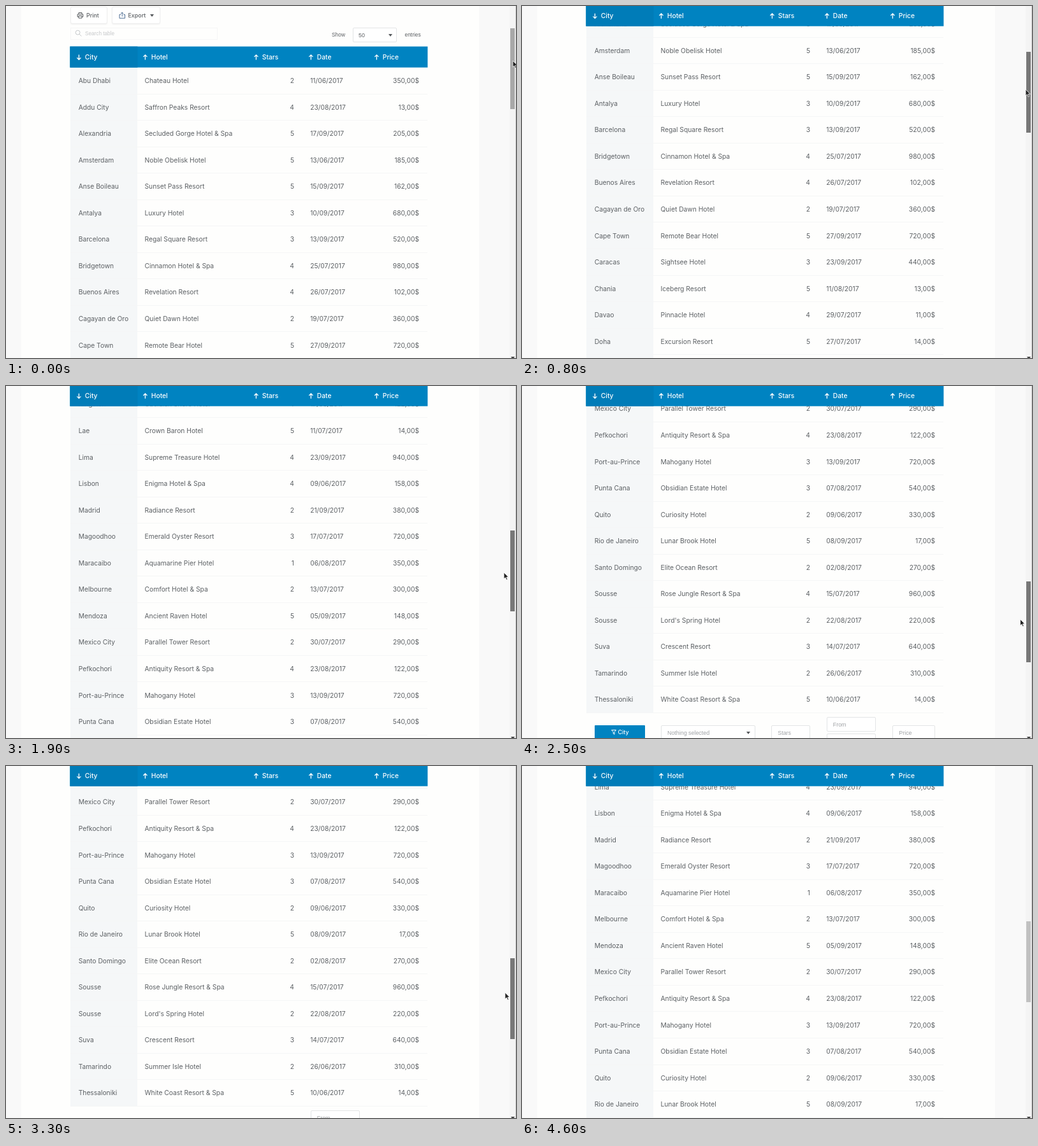
These frames come from a looping animation (800x553 px, 5100 ms). An HTML page:

```html
<!DOCTYPE html>
<html lang="en">
<head>
<meta charset="utf-8">
<title>Hotel table</title>
<style>
html, body { margin: 0; width: 100%; height: 100%; overflow: hidden; }
body { background: #f9f9f9; font: 10.28px Inter, sans-serif; color: #5c6064; }
#stage { position: absolute; left: 0; top: 0; width: 800px; height: 553px; overflow: hidden; }
#stage div, #stage span, #stage svg { position: absolute; box-sizing: border-box; white-space: pre; }
#card { left: 24px; top: 0; width: 718px; height: 553px; background: #fefefd; }
#page { left: 0; top: 0; width: 790px; height: 2000px; }
#cities { left: 101px; top: 97px; width: 105px; height: 1662px; background: #f5f7f8; }
.row { left: 101px; width: 560px; height: 41.55px; line-height: 41.6px; border-bottom: 1px solid #f5f6f6; }
.row span { top: 0; }
#head { left: 100px; top: 0; width: 561px; height: 33px; line-height: 33px; background: #0083c1; color: #fff; font-weight: 500; }
#head::before { content: ""; position: absolute; width: 106px; height: 33px; background: #007cb8; }
#head path { stroke-width: 1.3; }
.box { border: 1px solid #e3e5e6; border-radius: 2px; background: #fff; }
.btn { border: 1px solid #f0f0f0; border-radius: 3px; background: #fff; box-shadow: 0 1px 2px #0001; }
.label { line-height: 12px; font-size: 8.9px; }
.arial { font-family: "Liberation Sans", Arial, sans-serif; }
.hint { color: #a0a3a6; }
.caret { border: 3.5px solid transparent; border-top: 4px solid #55595c; border-bottom: 0; }
#track { left: 790px; top: 0; width: 10px; height: 553px; background: #f4f4f4; border-right: 1px solid #cfcfcf; }
#thumb { left: 791px; top: 0; width: 7px; height: 127px; }
#down { left: 792px; top: 551px; border-top-color: #444; }
#cursor { left: 0; top: 0; overflow: visible; }
</style>
</head>
<body>
<div id="stage">
  <div id="card"></div>
  <div id="page"><div id="cities"></div></div>
  <div id="head"></div>
  <div id="track"></div>
  <div id="thumb"></div>
  <div id="down" class="caret"></div>
  <svg id="cursor" width="10" height="14"><path d="M0 0V10L2.4 7.9 4 11.6 5.7 10.9 4.1 7.3H7.2Z" fill="#222" stroke="#fff" stroke-width=".8"/></svg>
</div>
<script>
const ROW = 41.55, TOP = 97, LOOP = 5100, STEP = 100, RELEASE = 3700;
const $ = id => document.getElementById(id);
const page = $('page'), head = $('head'), thumb = $('thumb'), cursor = $('cursor');

// city|hotel|stars|day/month|price
const rows = `Abu Dhabi|Chateau Hotel|2|11/06|350
Addu City|Saffron Peaks Resort|4|23/08|13
Alexandria|Secluded Gorge Hotel & Spa|5|17/09|205
Amsterdam|Noble Obelisk Hotel|5|13/06|185
Anse Boileau|Sunset Pass Resort|5|15/09|162
Antalya|Luxury Hotel|3|10/09|680
Barcelona|Regal Square Resort|3|13/09|520
Bridgetown|Cinnamon Hotel & Spa|4|25/07|980
Buenos Aires|Revelation Resort|4|26/07|102
Cagayan de Oro|Quiet Dawn Hotel|2|19/07|360
Cape Town|Remote Bear Hotel|5|27/09|720
Caracas|Sightsee Hotel|3|23/09|440
Chania|Iceberg Resort|5|11/08|13
Davao|Pinnacle Hotel|4|29/07|11
Doha|Excursion Resort|5|27/07|14
Florence|Mirror Resort|4|06/08|11
Freetown|Royal Tide Resort|2|02/08|250
Ilopango|Seashore Hotel & Spa|4|16/09|890
Kingston|Grandiose Renaissance Resort|3|09/07|620
Kingston|Obsidian Shore Hotel|4|17/08|122
Lae|Crown Baron Hotel|5|11/07|14
Lima|Supreme Treasure Hotel|4|23/09|940
Lisbon|Enigma Hotel & Spa|4|09/06|158
Madrid|Radiance Resort|2|21/09|380
Magoodhoo|Emerald Oyster Resort|3|17/07|720
Maracaibo|Aquamarine Pier Hotel|1|06/08|350
Melbourne|Comfort Hotel & Spa|2|13/07|300
Mendoza|Ancient Raven Hotel|5|05/09|148
Mexico City|Parallel Tower Resort|2|30/07|290
Pefkochori|Antiquity Resort & Spa|4|23/08|122
Port-au-Prince|Mahogany Hotel|3|13/09|720
Punta Cana|Obsidian Estate Hotel|3|07/08|540
Quito|Curiosity Hotel|2|09/06|330
Rio de Janeiro|Lunar Brook Hotel|5|08/09|17
Santo Domingo|Elite Ocean Resort|2|02/08|270
Sousse|Rose Jungle Resort & Spa|4|15/07|960
Sousse|Lord's Spring Hotel|2|22/08|220
Suva|Crescent Resort|3|14/07|640
Tamarindo|Summer Isle Hotel|2|26/06|310
Thessaloniki|White Coast Resort & Spa|5|10/06|14`.split('\n').map(r => r.split('|'));

function add(parent, tag, cls, style, text = '') {
  const el = document.createElement(tag);
  el.className = cls;
  el.style.cssText = style;
  el.textContent = text;
  parent.append(el);
  return el;
}
const box = (cls, x, y, w, h, extra = '') =>
  add(page, 'div', cls, `left:${x}px;top:${y}px;width:${w}px;height:${h}px;${extra}`);
const label = (text, x, mid, cls = '', extra = '') =>
  add(page, 'span', 'label ' + cls, `left:${x}px;top:${mid - 6}px;${extra}`, text);
const caret = (x, y) => add(page, 'div', 'caret', `left:${x - 3.5}px;top:${y - 2}px`);
function icon(parent, x, y, d, color, fill = 'none') {
  parent.insertAdjacentHTML('beforeend',
    `<svg width="12" height="12" style="left:${x}px;top:${y}px"><path d="${d}" fill="${fill}" stroke="${color}"/></svg>`);
}

// toolbar
box('btn', 101, 1, 58, 27);
icon(page, 111, 9, 'M3 4V1.5H8V4M3 8H1.2V4H9.8V8H8M3 6.5H8V10H3Z', '#55595c');
label('Print', 126, 15, '', 'font-weight:500');
box('btn', 166, 1, 76, 27);
icon(page, 177, 9, 'M3 4.5H1V10.2H9.5V4.5H7.5M5.2 7.5V1M3 3.2L5.2 1L7.4 3.2', '#4f6f94');
label('Export', 191.5, 15, '', 'font-weight:500');
caret(229, 14.5);
box('', 101, 34, 231, 19, 'border:1px solid #f6f6f6');
icon(page, 108, 37, 'M8 4.7A3.4 3.4 0 1 1 1.2 4.7A3.4 3.4 0 1 1 8 4.7M7 7.2L10.3 10.5', '#c4c7c9');
label('Search table', 124, 43.5, 'arial', 'font-size:8.2px;color:#c6c8ca');
label('Show', 511, 45, 'arial', 'font-size:8.4px');
box('box', 544, 34, 69, 23);
label('50', 553, 46, 'arial');
caret(603, 46);
label('entries', 625.5, 45, 'arial', 'font-size:8.4px');

// header cells: title, arrow x
[['City', 114], ['Hotel', 218], ['Stars', 392], ['Date', 478], ['Price', 581]].forEach(([title, x], i) => {
  const d = i ? 'M4 9V1.5M1 4.3L4 1.3L7 4.3' : 'M4 1V8.5M1 5.7L4 8.7L7 5.7';
  icon(head, x - 104, 11.5, d, '#fff');
  add(head, 'span', '', `left:${x - 90.6}px;top:0`, title);
});

rows.forEach(([city, hotel, stars, day, price], i) => {
  const row = add(page, 'div', 'row', `top:${TOP + i * ROW}px`);
  add(row, 'span', '', 'left:12.7px', city);
  add(row, 'span', '', 'left:116.5px', hotel);
  add(row, 'span', '', 'right:209px', stars);
  add(row, 'span', '', 'left:376.2px', day + '/2017');
  add(row, 'span', '', 'right:13px', price + ',00$');
});

// filters below the table
box('', 114, 1777.5, 78.5, 23.5, 'background:#0083c1;border-radius:1px');
icon(page, 139, 1784, 'M1.5 1.5H8.5L6 4.7V8.3L4.2 7V4.7Z', '#fff');
label('City', 150.5, 1789, '', 'color:#fff;font-weight:500');
box('box', 218, 1778, 148, 23);
label('Nothing selected', 228, 1790, 'arial hint');
caret(355, 1789.5);
[['Stars', 391, 1778, 61], ['From', 477.5, 1765, 77.5], ['To', 477.5, 1791, 77.5], ['Price', 581, 1778, 67]]
  .forEach(([text, x, y, w]) => {
    box('box', x, y, w, 23);
    label(text, x + 10.3, y + 11.5, 'arial hint');
  });
box('', 101, 1820, 560, 1, 'background:#f4f5f5');
label('Showing 1 to 40 of 40 entries', 113, 1848, '', 'font-size:9px;color:#45484b');

// time, scroll, scroll speed per ms, cursor x, cursor distance below thumb top
const keys = [
  [0, 0, 0, 795, 51],
  [600, 55, .26, 791, 57],
  [800, 172, .6, 790, 59],
  [1500, 580, .7, 783, 68],
  [1900, 878, .72, 781, 66],
  [3000, 1367, 0, 782, 54],
  [RELEASE, 957, -.25, 784, 54]
];

function pose(t) {
  t = Math.min(t, RELEASE);
  let i = 1;
  while (t > keys[i][0]) i++;
  const [t0, s0, v0, x0, o0] = keys[i - 1], [t1, s1, v1, x1, o1] = keys[i];
  const d = t1 - t0, u = (t - t0) / d, w = 1 - u;
  return {
    scroll: s0 * w * w * (1 + 2 * u) + s1 * u * u * (3 - 2 * u) + d * u * w * (v0 * w - v1 * u),
    x: x0 + (x1 - x0) * u,
    lead: o0 + (o1 - o0) * u
  };
}

const move = (el, x, y) => el.style.transform = `translate(${x}px,${y}px)`;
function draw(now) {
  const t = Math.floor(now % LOOP / STEP) * STEP;
  const { scroll, x, lead } = pose(t);
  const s = Math.round(scroll), y = Math.floor(35 + scroll / 4.57);
  move(page, 0, -s);
  move(head, .4, Math.max(63.6 - s, -1.3));
  move(thumb, 0, y);
  thumb.style.background = t < STEP ? '#a8a8a8' : t < RELEASE ? '#787878' : '#c1c1c1';
  move(cursor, x, y + lead);
  cursor.style.visibility = t < RELEASE ? 'visible' : 'hidden';
}

const start = performance.now();
function tick() {
  draw(performance.now() - start);
  requestAnimationFrame(tick);
}
tick();
</script>
</body>
</html>
```
